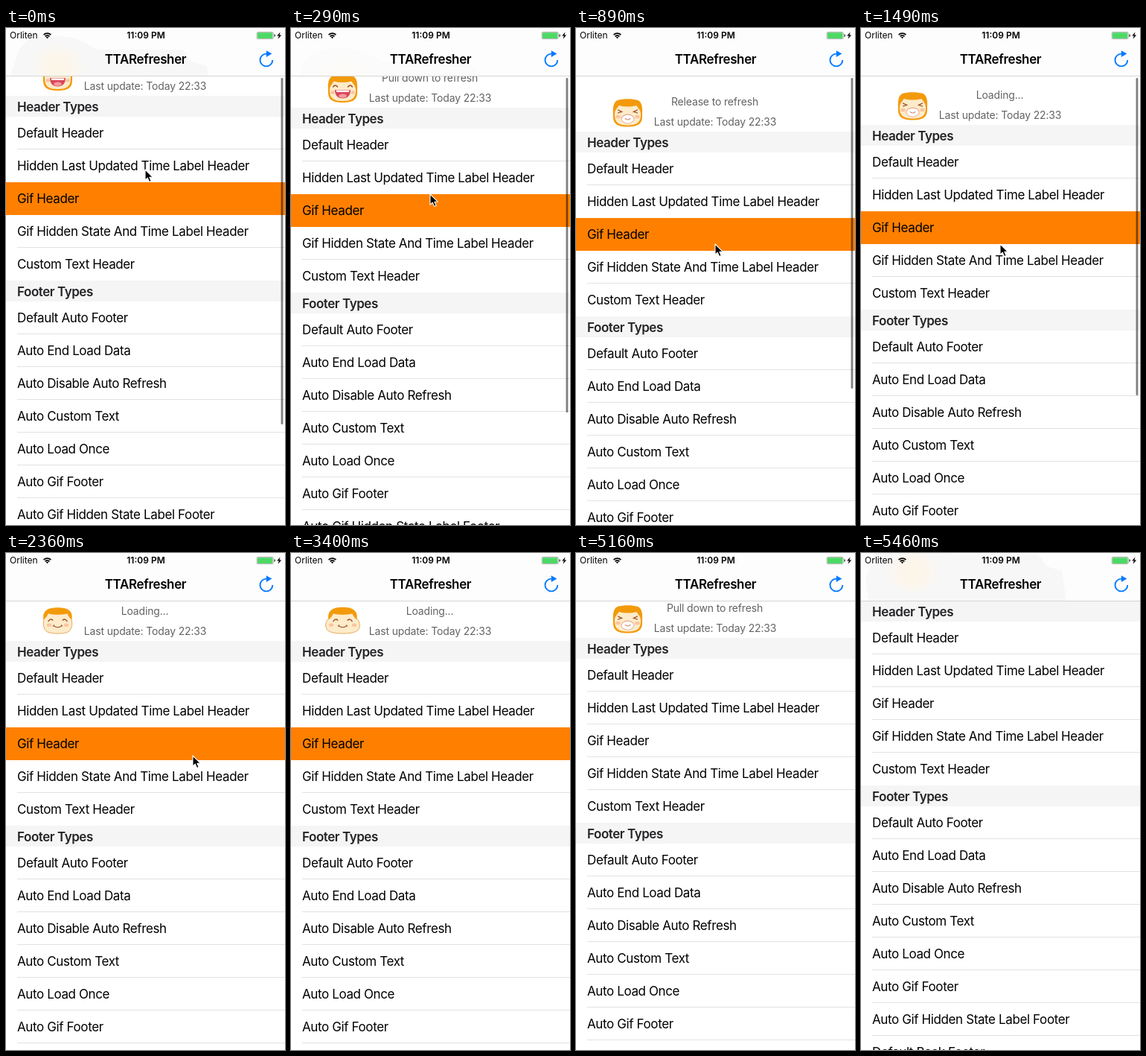
These frames come from a looping animation (375 by 667 pixels, 5900 ms). An HTML page:

```html
<!DOCTYPE html>
<html lang="en">
<head>
<meta charset="utf-8">
<title>Pull to refresh</title>
<style>
html, body { margin: 0; width: 100%; height: 100%; overflow: hidden; background: #fff; }
svg { display: block; width: 375px; height: 667px; }
text { font-family: Inter, "Liberation Sans", sans-serif; font-optical-sizing: none; }
.row { font-size: 17px; letter-spacing: -.385px; fill: #000; }
.head { font-size: 17px; font-weight: 600; letter-spacing: -.45px; fill: #232326; }
.title { font-size: 17px; font-weight: 600; letter-spacing: -.36px; }
.label { font-size: 14px; letter-spacing: -.16px; fill: #636363; text-anchor: middle; }
.status { font-size: 12px; fill: #000; }
.mid { text-anchor: middle; }
</style>
</head>
<body>
<svg viewBox="0 0 375 667">
  <defs>
    <clipPath id="bar"><rect width="375" height="64"/></clipPath>
    <radialGradient id="warm">
      <stop offset="0" stop-color="#fdf5e7"/>
      <stop offset=".6" stop-color="#fbf6ee"/>
      <stop offset="1" stop-color="#f7f7f7" stop-opacity="0"/>
    </radialGradient>
  </defs>
  <rect width="375" height="667" fill="#fff"/>
  <g id="table">
    <text id="state" class="label" x="186.5" y="-35"></text>
    <text class="label" x="187" y="-8">Last update: Today 22:33</text>
    <g id="faces"></g>
    <g id="list"></g>
  </g>
  <rect id="thumb" x="369.6" y="67" width="2.8" rx="1.3" fill="#000" fill-opacity=".5"/>

  <rect width="375" height="64" fill="#fdfdfd"/>
  <g clip-path="url(#bar)">
    <g id="haze">
      <path d="M10 0L6 -28L14 -50C20 -76 36 -80 66 -80C96 -80 108 -70 122 -62H238L250 -46L270 -40L276 0Z" fill="#f7f7f7"/>
      <ellipse cx="70" cy="-39" rx="40" ry="36" fill="url(#warm)"/>
    </g>
  </g>
  <rect y="64" width="375" height="1" fill="#d6d6d6"/>
  <text class="status" x="5" y="14">Orliten</text>
  <g fill="none" stroke="#000" stroke-width="1.7">
    <path d="M50.6 9.2a7 7 0 0 1 9.8 0M52.6 11.3a4.1 4.1 0 0 1 5.8 0"/>
    <path d="M55.5 14.3l-1.7-1.7a2.4 2.4 0 0 1 3.4 0z" fill="#000" stroke="none"/>
  </g>
  <text class="status mid" x="188" y="14" font-weight="600">11:09 PM</text>
  <rect x="337.2" y="5.5" width="22" height="9.2" rx="1.6" fill="#fff" stroke="#777" stroke-width=".6"/>
  <rect x="338" y="6.3" width="20.4" height="7.6" rx=".8" fill="#4cd964"/>
  <path d="M360.4 8.3a1.8 1.8 0 0 1 0 3.6z" fill="#555"/>
  <path d="M368.6 5.5l-4.4 5h2.6l-1.2 4.2 4.6-5.3h-2.7z"/>
  <text class="title mid" x="187.5" y="48">TTARefresher</text>
  <path d="M358.3 43a8.4 8.4 0 1 1-8.4-8.4" fill="none" stroke="#007aff" stroke-width="1.9"/>
  <path d="M349.8 30.3v8.7l7.6-4.4z" fill="#007aff"/>

  <path id="cursor" d="M0 0V14.2L3.3 11.2L5.7 16.6L8.2 15.5L5.9 10.2H10.2Z" fill="#000" stroke="#fff" stroke-width="1.1" stroke-linejoin="round"/>
</svg>
<script>
const $ = id => document.getElementById(id);
const ROW = 44, HEAD = 28, LOOP = 5900;
const sections = [
  ["Header Types", "Default Header", "Hidden Last Updated Time Label Header", "Gif Header",
   "Gif Hidden State And Time Label Header", "Custom Text Header"],
  ["Footer Types", "Default Auto Footer", "Auto End Load Data", "Auto Disable Auto Refresh",
   "Auto Custom Text", "Auto Load Once", "Auto Gif Footer",
   "Auto Gif Hidden State Label Footer", "Default Back Footer"]
];

function buildList() {
  let y = 0, out = "";
  for (const [title, ...rows] of sections) {
    out += `<rect y="${y}" width="375" height="${HEAD}" fill="#f5f5f5"/>
      <text class="head" x="15" y="${y + 21}">${title}</text>`;
    y += HEAD;
    rows.forEach((name, i) => {
      if (i < rows.length - 1)
        out += `<rect x="15" y="${y + ROW - 1}" width="360" height="1" fill="#e2e2e4"/>`;
      if (name === "Gif Header")
        out += `<g id="pick"><rect y="${y - 1}" width="375" height="1" fill="#fff"/>
          <rect y="${y}" width="375" height="${ROW}" fill="#ff8000"/></g>`;
      out += `<text class="row" x="15" y="${y + 28}">${name}</text>`;
      y += ROW;
    });
  }
  return out;
}

// Faces, each drawn around its own centre
const HAIR = "#f39a0b", SKIN = "#fdebc9", BROWN = "#9a4a22";
const line = (d, w = 1.3, c = BROWN) =>
  `<path d="${d}" fill="none" stroke="${c}" stroke-width="${w}" stroke-linecap="round"/>`;
const oval = (x, y, rx, ry, c) => `<ellipse cx="${x}" cy="${y}" rx="${rx}" ry="${ry}" fill="${c}"/>`;
const pair = (x, y, rx, ry, c) => oval(-x, y, rx, ry, c) + oval(x, y, rx, ry, c);

const hood = `<path d="M-14 -17C-6 -19.5 6 -19.5 14 -17C20 -14 20 -5 19.5 3C20 14 15 18.5 0 18.5S-20 14 -19.5 3C-20 -5 -20 -14 -14 -17Z" fill="${HAIR}"/>
  <path d="M-12 -10C-4 -8 4 -8 12 -10C14 -6 17 -5 17.5 1C18 12 13 16.5 0 16.5S-18 12 -17.5 1C-17 -5 -14 -6 -12 -10Z" fill="${SKIN}"/>`;

const laugh = hood + line("M-13 -2.5q3 -4 6 0M7 -2.5q3 -4 6 0") + pair(13.5, 5, 2.8, 2.2, "#fbc3a0") +
  `<path d="M-10.5 1.5H10.5C10.5 9.5 6 13 0 13S-10.5 9.5 -10.5 1.5Z" fill="#d9485a"/>
   <path d="M-9 2H9L8.2 4.4H-8.2Z" fill="#fff"/>` + oval(0, 9.6, 5.2, 2.6, "#f59a9d");

const munch = hood + line("M-13 -4l5 2.4l-5 1.6M13 -4l-5 2.4l5 1.6") + pair(13, 5, 3.2, 2.3, "#fbc3a0") +
  oval(0, 8, 9, 6.4, "#e9a98c") + oval(0, 8.2, 8, 5.5, "#fff") +
  line("M-3.5 7.5q3.5 3 7 0", 1.1, "#d98a78");

const smile = (w, top) => `
  <path d="M-18 -4C${1 - w} 0 ${-w - 1} 8 ${4 - w} 13C-14 18.5 14 18.5 ${w - 4} 13C${w + 1} 8 ${w - 1} 0 18 -4L12 -13H-12Z"
    fill="${SKIN}" stroke="#e0a352" stroke-width=".9"/>
  <path d="M-19 -1.5C-21 -14 -13 ${top} 0 ${top}S21 -14 19 -1.5C16 -4 14 -6.5 13 -9.5C4 -7.8 -4 -7.8 -13 -9.5C-14 -6.5 -16 -4 -19 -1.5Z" fill="${HAIR}"/>`
  + pair(w - 8.5, 5.8, 3.2, 2.2, "#fbc5a2")
  + line("M-12.6 .6q2.4 -4.4 6 -1.4M12.6 .6q-2.4 -4.4 -6 -1.4")
  + line("M-5.5 6.6q5.5 4.4 11 0M-6.2 7.2l1.4 -1.4M6.2 7.2l-1.4 -1.4", 1.1);

const faces = { laugh: [laugh, -25.5], munch: [munch, -25], slim: [smile(20, -17.8), -27], wide: [smile(24, -18.2), -27] };
$("faces").innerHTML = Object.entries(faces).map(([name, [art, y]]) =>
  `<g id="${name}" transform="translate(69.5 ${y})">${art}</g>`).join("");
$("list").innerHTML = buildList();

const HOLD = 6, LAST = 34;
const short = new Set([2, 7, 9, 12, 18, 22, 25, 29, 32]);
const starts = [0];
for (let i = 0; i < LAST; i++)
  starts.push(starts[i] + (i === HOLD ? 600 : short.has(i) ? 140 : 150));

const clamp = x => Math.max(0, Math.min(1, x));
const smooth = x => (x = clamp(x), x * x * (3 - 2 * x));
const mix = (a, b, p) => a + (b - a) * p;

const pull = t => 1 - Math.pow(1 - clamp(t / 890), 2.2);
function offset(t) {
  if (t < 1490) return Math.round(91 + 48 * pull(t));
  if (t < 5020) return Math.round(mix(139, 118, smooth((t - 1308) / 400)));
  return Math.round(mix(118, 64, smooth((t - 4950) / 400)));
}

const path = [[1490, 187, 290], [1930, 203, 288], [2360, 251, 272], [2660, 281, 300], [2960, 272, 480], [3260, 262, 690]];
function pointer(t) {
  if (t <= 1490) return [187, 190 + 100 * pull(t)];
  for (let i = 1; i < path.length; i++) {
    const a = path[i - 1], b = path[i];
    if (t <= b[0]) {
      const p = (t - a[0]) / (b[0] - a[0]);
      return [mix(a[1], b[1], p), mix(a[2], b[2], p)];
    }
  }
  return [262, 700];
}

function draw(now) {
  const time = now % LOOP;
  let n = LAST;
  while (n && starts[n] > time) n--;
  const t = starts[n], y = offset(t);
  const busy = t >= 1490 && t < 5020;

  $("table").setAttribute("transform", `translate(0 ${y})`);
  $("state").textContent = busy ? "Loading..." : t < 1490 && y >= 118 ? "Release to refresh" : "Pull down to refresh";
  const pose = t > 1490 && busy ? (n % 2 ? "slim" : "wide") : y < 112 && t < 1490 ? "laugh" : "munch";
  for (const name in faces) $(name).style.display = name === pose ? "" : "none";
  $("pick").style.display = t < 5020 ? "" : "none";

  $("thumb").setAttribute("height", 556 - y);
  $("thumb").style.opacity = 1 - clamp((t - 1750) / 300);
  $("haze").setAttribute("transform", `translate(0 ${y})`);
  $("haze").style.opacity = clamp((112 - y) / 20);
  $("cursor").setAttribute("transform", `translate(${pointer(t).map(Math.round).join(" ")})`);
}

function tick() {
  draw(performance.now());
  requestAnimationFrame(tick);
}
tick();
</script>
</body>
</html>
```
